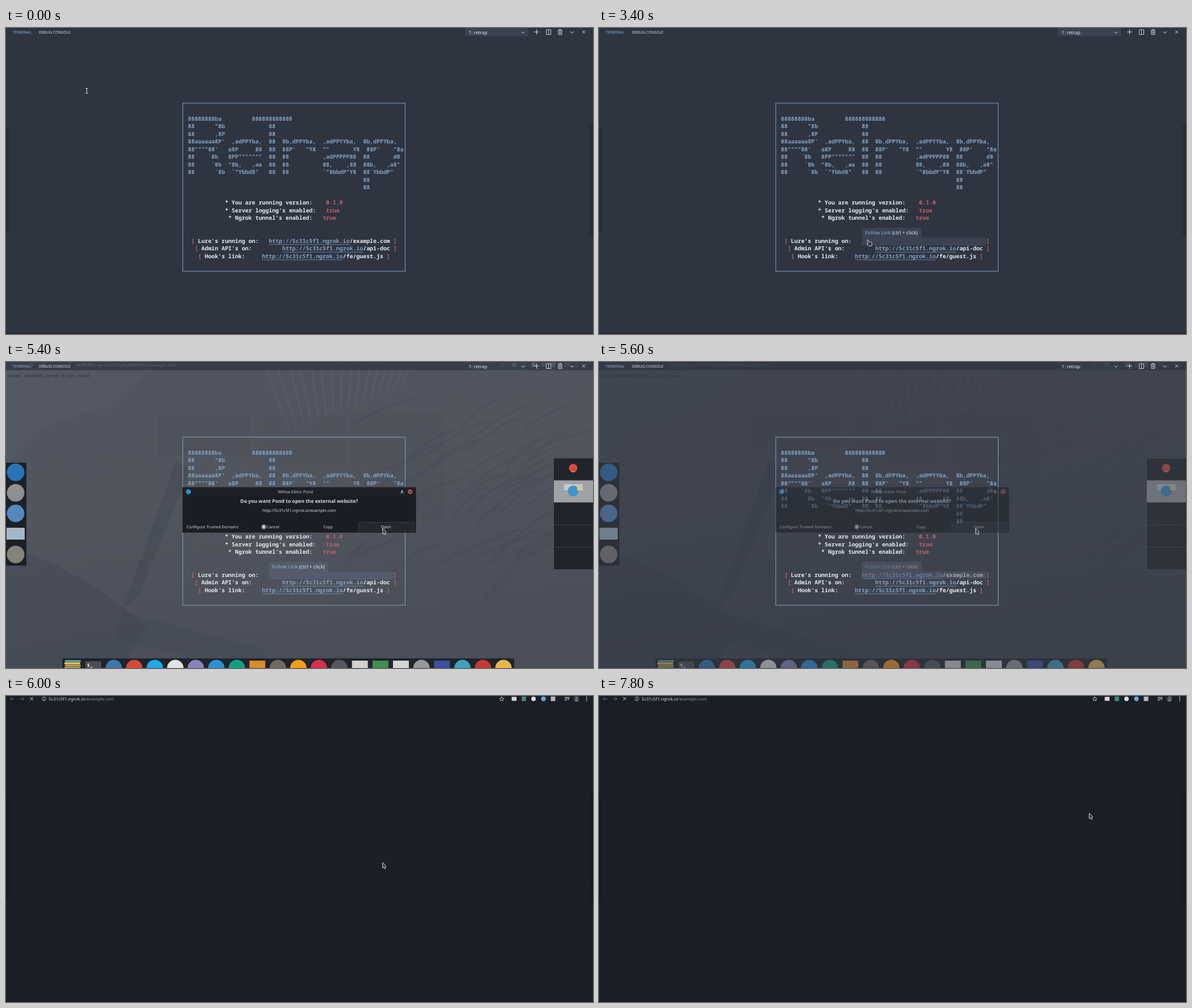
Write an HTML page that moves like this. It is 1036 by 541 pixels and loops after 8000 ms.

```html
<!DOCTYPE html>
<html lang="en">
<head>
<meta charset="utf-8">
<title>Terminal session</title>
<style>
html, body { margin: 0; width: 100%; height: 100%; overflow: hidden; background: #2e3440; }
svg { display: block; width: 100vw; height: 100vh; }
text { font-family: "Noto Sans", sans-serif; white-space: pre; text-rendering: geometricPrecision; }
.mono { font-family: "Noto Sans Mono", monospace; font-weight: 600; }
.small { font-family: "DejaVu Sans Mono", monospace; }
.bold { font-weight: 700; }
.line { fill: none; stroke: #d8dee9; }
</style>
</head>
<body>
<pre id="screen" hidden>
88888888ba         888888888888
88      "8b             88
88      ,8P             88
88aaaaaa8P'  ,adPPYba,  88  8b,dPPYba,  ,adPPYYba,  8b,dPPYba,
88""""88'   a8P     88  88  88P'   "Y8  ""       Y8  88P'    "8a
88    `8b   8PP"""""""  88  88          ,adPPPPP88  88       d8
88     `8b  "8b,   ,aa  88  88          88,    ,88  88b,   ,a8"
88      `8b  `"Ybbd8"   88  88          `"8bbdP"Y8  88`YbbdP"
                                                    88
                                                    88

           * You are running version:    0.1.0
           * Server logging's enabled:   true
            * Ngrok tunnel's enabled:   true


 [ Lure's running on:   http://5c31c5f1.ngrok.io/example.com ]
  [ Admin API's on:         http://5c31c5f1.ngrok.io/api-doc ]
   [ Hook's link:     http://5c31c5f1.ngrok.io/fe/guest.js ]
</pre>
<svg id="stage" viewBox="0 0 1036 541" preserveAspectRatio="none"></svg>
<script>
const BLUE = '#81a1c1', RED = '#bf616a', WHITE = '#e5e9f0';
const CELL = 5.947, ROW = 13.5, LEFT = 321, TOP = 160;

const rect = (x, y, w, h, fill, more = '') =>
  `<rect x="${x}" y="${y}" width="${w}" height="${h}" fill="${fill}" ${more}/>`;
const circle = (x, y, r, fill, more = '') =>
  `<circle cx="${x}" cy="${y}" r="${r}" fill="${fill}" ${more}/>`;
const path = (d, more = '') => `<path class="line" d="${d}" ${more}/>`;
const text = (x, y, size, fill, s, more = '') =>
  `<text x="${x}" y="${y}" font-size="${size}" fill="${fill}" ${more}>${s}</text>`;
const group = (id, s, more = '') => `<g id="${id}" ${more}>${s}</g>`;
const centered = 'text-anchor="middle"';

// Terminal: each word sits on the character grid.
function terminalText() {
  let out = '';
  document.getElementById('screen').textContent.split('\n').forEach((line, row) => {
    for (const { 0: word, index } of line.matchAll(/http:\/\/[\w.]+|\S+/g)) {
      const link = word.startsWith('http');
      const fill = row < 10 || link ? BLUE : /^(\[|\]|true|0\.1\.0)$/.test(word) ? RED : WHITE;
      const x = LEFT + index * CELL, y = TOP + row * ROW;
      out += text(x, y + 3.6, CELL / .6, fill, word, 'class="mono"');
      if (link) out += rect(x, y + 6.3, word.length * CELL, 1, BLUE, 'opacity=".75"');
    }
  });
  return out;
}

const edges =
  rect(0, 178, 8, 182, 'url(#leftEdge)') + rect(1028, 170, 8, 197, 'url(#rightEdge)') +
  rect(0, 538.5, 1036, 2.5, '#000', 'opacity=".15"');

const terminal = group('terminalBack', rect(0, 0, 1036, 541, '#2e3440') + edges) +
  group('desktop', desktop()) +
  group('dropdown', rect(810.5, 0, 110.5, 14.5, '#3b4252')) +
  text(11.7, 9.6, 6.8, '#88b4cc', 'TERMINAL') +
  text(58, 9.6, 6.8, '#d8dee9', 'DEBUG CONSOLE') +
  text(816.5, 10.6, 8.3, WHITE, '1: retrap') +
  path('M909.5 6.5l3 3 3-3M995.5 6l3.3 3.3 3.3-3.3M932 7h9M936.5 2.5v9M1017 4.5l5 5m0-5l-5 5') +
  path('M953.5 3h8v8.5h-8zM957.5 3v8.5', 'stroke-width=".9"') +
  path('M974 4h8M976.5 3.5v-1h3v1M975 4v7.5h6V4M977 5.5v4.5M979 5.5v4.5', 'stroke-width=".9"') +
  rect(312, 132.8, 392.5, 297.2, 'none', `stroke="${BLUE}"`) +
  terminalText();

const tooltip =
  group('tipBack', rect(464, 370.5, 220, 12.5, '#3b4252') + rect(464, 353, 105, 18, '#3b4252')) +
  text(469.3, 364.8, 8.75, '#88b4cc', `Follow Link <tspan fill="${WHITE}">(ctrl + click)</tspan>`);

function tools() {
  return path('M14.500 5h-7m3-3l-3 3 3 3M24.500 5h7m-3-3l3 3-3 3', 'opacity=".4"') +
    path('M42.500 2l5.500 5.500m0-5.500l-5.500 5.500') +
    path('M67 4.500v3M67 2.300v1.100', 'stroke-width=".9"') +
    circle(67, 5, 3.4, 'none', 'stroke="#b4bac4" stroke-width=".8"') +
    path('M875 1.300l1.100 2.500 2.700.3-2 1.800.6 2.700-2.400-1.400-2.400 1.400.6-2.700-2-1.800 2.700-.3z', 'stroke-width=".8"') +
    rect(892.5, 1.5, 8.5, 7, '#d5d9de') + rect(910.2, 1, 7.5, 8, '#3f8a78') +
    circle(931, 5, 4, '#dcdcdc') + circle(948.5, 5, 4.2, '#68a7dd') + rect(961.5, 1, 8, 8, '#b4b6ba') +
    path('M986 2.500h6M986 5h6M986 7.500h3.500M993 7V2.500h1.500', 'stroke-width="1.1"') +
    circle(1007, 5, 5.3, '#3c4047') + circle(1007, 3.4, 1.8, '#777b80') + rect(1004, 6, 6, 3.5, '#777b80', 'rx="2"') +
    [1.8, 5, 8.2].map(y => circle(1024.8, y, .9, '#d8dee9')).join('');
}

// Soft grey wallpaper with feathery strands, seen through the panel.
function desktop() {
  let seed = 7;
  const random = () => (seed = seed * 16807 % 2147483647) / 2147483647;
  let strands = '';
  for (let i = 0; i < 46; i++) {
    const x = 700 + random() * 330, y = 60 + random() * 270, length = 50 + random() * 100;
    strands += `M${x} ${y}q${-length * .5} ${length * .15} ${-length} ${length * (.3 + random() * .6)}`;
  }
  let plumes = '';
  for (let i = 0; i < 16; i++) plumes += `M${500 + i * 13} ${120 - i * 5}l${-40 + i * 6} ${-90 - random() * 30}`;
  return rect(0, 0, 1036, 541, 'url(#wall)') +
    `<path d="M0 330Q110 350 250 470L200 541H0Z" fill="#3e444e" opacity=".35"/>
     <path d="M300 175L325 190 235 410 205 440Z" fill="#3b414b" opacity=".3"/>
     <path d="M205 440L330 475 460 510 420 541 190 490Z" fill="#3e434d" opacity=".25"/>
     <path d="M0 0H270L180 80 60 115 0 180Z" fill="#626771" opacity=".2"/>` +
    path(strands, 'style="stroke:#373d47" stroke-width="4" opacity=".18"') +
    path(plumes, 'style="stroke:#696e77" stroke-width="3" opacity=".25"') +
    rect(268, 94, 162, 71, '#454a54', 'opacity=".22"') + rect(442, 94, 158, 90, '#454a54', 'opacity=".18"') +
    rect(610, 90, 165, 190, '#454a54', 'opacity=".18"') +
    rect(0, 0, 1036, 14.5, '#343943', 'opacity=".85"') + `<g opacity=".2">${tools()}</g>` +
    text(124, 7.8, 7.65, '#5f6570', 'e64fb893.ngrok.io/http%3A%2F%2Fexample.com') +
    text(3, 26.5, 7.03, '#282d36', 'Tunnel e64fb893.ngrok.io not found', 'class="small"');
}

function docks() {
  const side = ['#2874b5', '#8d8f91', '#5388be', '#a4b8c8', '#85817b'];
  let out = rect(0, 178, 36, 182, '#1c2027') +
    side.map((fill, i) => i == 3 ? rect(1, 293, 32, 21, fill) : circle(17, 195 + i * 36.3, 15.5, fill)).join('');

  out += rect(99.5, 524, 797.5, 17, '#20242b') +
    ['#5aa7a0', '#e3c65a', '#d98b4a', '#83b86b'].map((fill, i) => rect(104 - i % 2, 527 + i * 4, 28, 3.4, fill, 'rx="1"')).join('') +
    rect(140, 529, 28, 12, '#4b4e52', 'rx="2"') + text(143, 539, 8, '#eee', '$_', 'class="mono"');
  const squares = new Set([7, 12, 13, 14, 16]);
  ['#3a76b0', '#d9493a', '#1fa8ea', '#e0e0e5', '#8983bd', '#2a8fd8', '#12a085', '#d98c2b', '#716960', '#f59a1b',
   '#d92d48', '#55575c', '#d0d0d0', '#3f8f4f', '#d5d5d7', '#96989a', '#3d4fa0', '#3f9fbf', '#c73a32', '#e8b64a']
    .forEach((fill, i) => {
      const x = 190.2 + i * 36.2;
      out += squares.has(i) ? rect(x - 14, 528, 28, 13, fill) : circle(x, 541, 14.5, fill);
    });

  out += rect(966.5, 170, 70, 197, '#20242b', 'stroke="#4d525b"') + rect(967, 209, 69, 39, '#a0a2a5') +
    path('M966 209h70M966 248.500h70M966 288h70M966 327.500h70', 'style="stroke:#41464f"') +
    circle(1001, 187.5, 7.5, '#d9493a') + text(1001, 194.5, 3, '#ddd', 'Beta', centered) +
    rect(985, 216, 33, 11, '#c5c8cb') + circle(1001, 228, 9.5, '#3d94d1') + rect(1008, 219, 9, 8, '#d9c98b');
  return out;
}

const dialog = rect(312, 222, 411, 79, '#1a1d23', 'stroke="#121419" stroke-width="1"') +
  rect(312.5, 222.5, 410, 14.5, '#1c2027') +
  circle(322, 229.5, 4.3, '#2494da') +
  text(511, 232, 6.95, '#c5cad2', 'Willow Editor Pond', centered) +
  `<path d="M696.500 229.500h5l-2.500-3zM696.500 230.700h5v1.100h-5z" fill="#c5cad2"/>` +
  circle(713.2, 229.3, 4, '#c54b58') + path('M711.700 227.800l3 3m0-3l-3 3', 'style="stroke:#23262d"') +
  text(517.5, 249, 8.6, '#d3dae3', 'Do you want Pond to open the external website?', `${centered} class="bold"`) +
  text(517.5, 265.3, 7.22, '#d3dae3', 'http://5c31c5f1.ngrok.io/example.com', centered) +
  group('hover', rect(622.5, 283.5, 98, 15.5, '#24272e', 'stroke="#363a42"')) +
  text(318.7, 294, 7.08, '#d3dae3', 'Configure Trusted Domains') +
  circle(455, 291.5, 3.8, 'none', 'stroke="#e5e9f0" stroke-width=".9"') + circle(455, 291.5, 2.4, '#e5e9f0') +
  text(460.3, 294, 7.08, '#d3dae3', 'Cancel') +
  text(568.5, 294, 7.08, '#d3dae3', 'Copy', centered) +
  text(670.5, 294, 7.08, '#d3dae3', 'Open', centered);

const browser = rect(0, 0, 1036, 541, '#1c1f26') + rect(0, 0, 1036, 14.5, '#1b1e25') + edges + tools() +
  text(75.3, 7.8, 7.7, '#d3dae3', '5c31c5f1.ngrok.io<tspan fill="#8c929c">/example.com</tspan>');

const cursors =
  group('beam', path('M-2.500-5H2.500M-2.500 5H2.500M0-5V5', 'style="stroke:#20242b" stroke-width="2.4"') +
    path('M-2.300-4.500H2.300M-2.300 4.500H2.300M0-4.500V4.500', 'stroke-width="1.2"')) +
  group('hand', `<path d="M-3.500-5.200q1.200-.9 2 .3l1.300 3 3 .5q2 .5 2 2.300l-.2 2.300-1 2.300H-.8l-3-3q-.9-1.500.9-1.500l.9.4-1.700-5z"
    fill="#2e3440" stroke="#e5e9f0" stroke-width=".9"/>`) +
  group('arrow', `<path d="M0 0V9.500L2.300 8.400 3.600 11 5.400 10.200 4.600 7.500 6.300 6.400Z"
    fill="#343a45" stroke="#e5e9f0" stroke-width=".9" stroke-linejoin="round"/>`);

const fade = (id, from, to) => `<linearGradient id="${id}"><stop stop-opacity="${from}"/><stop offset="1" stop-opacity="${to}"/></linearGradient>`;

document.getElementById('stage').innerHTML =
  `<defs>${fade('leftEdge', .2, .04)}${fade('rightEdge', .04, .2)}
   <linearGradient id="wall" x2=".3" y2="1"><stop stop-color="#50555f"/><stop offset=".5" stop-color="#50555e"/>
   <stop offset="1" stop-color="#494e58"/></linearGradient></defs>` +
  terminal +
  group('linkHover', rect(LEFT + 48 * CELL, 382.3, 12 * CELL, 1, BLUE)) +
  group('tooltip', tooltip) + group('overlay', docks() + dialog) + group('browser', browser) + cursors;

const part = id => document.getElementById(id);
const show = (id, opacity) => {
  part(id).style.opacity = +opacity;
  part(id).style.display = opacity ? '' : 'none';
};

const TICK = 200;
const ease = p => p * p * (3 - 2 * p);
// Moves from a to b; the first step lands on `start`, the last one on `end`.
function glide(t, start, end, a, b) {
  const p = ease(Math.min(1, Math.max(0, (t - start + TICK) / (end - start + TICK))));
  return a.map((v, i) => v + (b[i] - v) * p);
}

function pointer(t) {
  if (t < 1600) return ['beam', glide(t, 400, 1200, [142.5, 111], [255.5, 296.5])];
  if (t < 2800) return ['beam', glide(t, 1600, 2600, [255.5, 296.5], [461.8, 381])];
  if (t < 4400) return ['hand', [477, 380]];
  if (t < 7000) return ['arrow', glide(t, 4400, 4800, [474, 375], [664.7, 294.3])];
  return ['arrow', glide(t, 7000, 7800, [664.7, 294.3], [865.2, 207.2])];
}

function draw(now) {
  const t = Math.floor(now % 8000 / TICK) * TICK;
  const overlay = t < 3800 || t >= 5800 ? 0 : t < 5600 ? 1 : .5;
  show('desktop', overlay);
  show('overlay', overlay);
  show('dropdown', overlay ? .3 : 1);
  show('linkHover', t >= 2800 && t < 5600);
  show('tooltip', t < 3200 || t >= 5800 ? 0 : t < 3400 || t >= 5600 ? .5 : 1);
  // Behind the translucent panel the link text is still covered.
  part('tipBack').setAttribute('style', overlay ? 'filter:brightness(1.38) saturate(.7)' : '');
  show('hover', t >= 4800);
  show('browser', t >= 6000);
  const [kind, [x, y]] = pointer(t);
  for (const id of ['beam', 'hand', 'arrow']) show(id, id === kind);
  part(kind).setAttribute('transform', `translate(${x} ${y})`);
  requestAnimationFrame(draw);
}
const begin = performance.now();
requestAnimationFrame(now => draw(Math.max(0, now - begin)));
</script>
</body>
</html>
```
